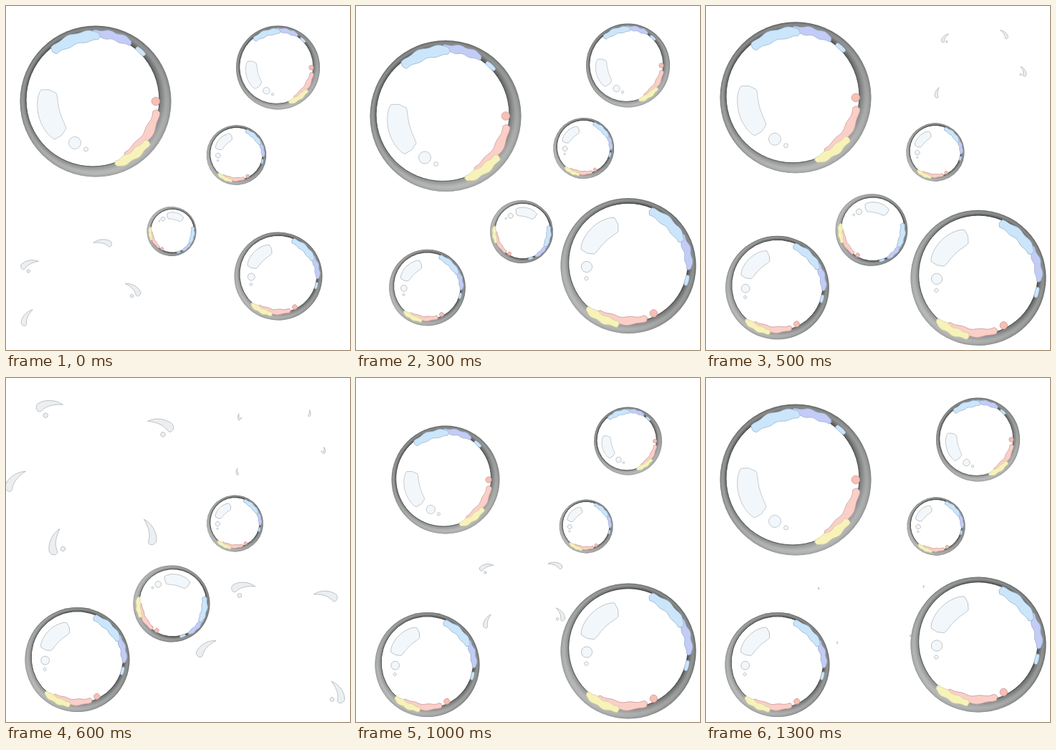
These frames come from a looping animation (480 by 480 pixels, 1400 ms). An HTML page with a canvas:

```html
<!DOCTYPE html>
<html>
<head>
<meta charset="utf-8">
<title>Bubbles</title>
<style>
html, body { margin: 0; width: 100%; height: 100%; overflow: hidden; background: #fff; }
canvas { display: block; width: 100vw; height: 100vh; }
</style>
</head>
<body>
<canvas id="stage" width="480" height="480"></canvas>
<script>
const ctx = document.getElementById('stage').getContext('2d');
const STEP = 100, STEPS = 14, SIZE = 105.6;
const rad = deg => deg * Math.PI / 180;

// A bubble is born at a share `from` of its radius r and grows by `rate` each step.
// sway: [step, y] key points; drops: directions in which it bursts at step `pop`.
const bubbles = [
  { x: 125, r: 105.5, turn: 0, born: 9, from: .58, rate: .135, pop: 6, span: 3,
    drops: [-125, 174, 120, 48, -36], sway: [[0, 133], [3, 153.5], [4, 125], [10, 142], [13, 142]] },
  { x: 379.5, r: 58.5, turn: 0, born: 7, from: .42, rate: .13, pop: 4, span: 3,
    drops: [-127, -62, -3, 155], sway: [[0, 86], [3, 83], [8, 90], [12, 86]] },
  { x: 321.5, r: 40, turn: 62, born: 0, from: 1, rate: 0, pulse: .07, lean: .4,
    sway: [[0, 208], [3, 198.5], [4, 205], [6, 203], [8, 217], [10, 207]] },
  { x: 231, r: 57.5, turn: 119, born: 0, from: .6, rate: .055, pop: 10, span: 4,
    drops: [-143, -40, 28, 141], sway: [[0, 314.5], [3, 315], [4, 310], [6, 315], [8, 300.5]] },
  { x: 380, r: 94.5, turn: 62, born: 0, from: .65, rate: .12, pop: 6, span: 3,
    drops: [-119, -49, 35, 182], sway: [[0, 377], [3, 362.5], [4, 379], [10, 381], [13, 372]] },
  { x: 99.5, r: 73, turn: 62, born: 3, from: .73, rate: .13, pop: 0, span: 3,
    drops: [-149, -63, -4, 154], sway: [[0, 400], [3, 393], [6, 393], [8, 400]] }
];

function heightAt(sway, step) {
  const i = sway.findIndex(k => k[0] >= step);
  if (i < 0) return sway[sway.length - 1][1];
  const [s1, y1] = sway[i], [s0, y0] = sway[Math.max(0, i - 1)];
  return s1 === s0 ? y1 : y0 + (y1 - y0) * (step - s0) / (s1 - s0);
}

function paint(fill, line) {
  ctx.fillStyle = fill;
  ctx.fill();
  if (line) {
    ctx.strokeStyle = line;
    ctx.stroke();
  }
}

function dot(x, y, r, fill, line) {
  ctx.beginPath();
  ctx.arc(x, y, r, 0, 7);
  paint(fill, line);
}

// Curved patch between two angles and two radii, with rounded ends and a slightly wavy edge
function band(a0, a1, r0, r1, fill, line, wave = 0) {
  const n = 28;
  ctx.beginPath();
  for (let i = 0; i <= 2 * n; i++) {
    const side = i <= n ? 1 : -1, u = side > 0 ? i / n : 2 - i / n;
    const half = (r1 - r0) / 2 * Math.abs(Math.sin(Math.PI * u)) ** .15;
    const r = (r0 + r1) / 2 + side * half + wave * Math.sin(u * 17 + side);
    const a = rad(a0 + (a1 - a0) * u);
    ctx.lineTo(r * Math.cos(a), r * Math.sin(a));
  }
  ctx.closePath();
  paint(fill, line);
}

const rim = ctx.createRadialGradient(-4, -2, 92, 0, 0, SIZE);
['#2f3231', '#505453', '#6e7170', '#858887', '#7b7e7d', '#565958'].forEach((c, i) => rim.addColorStop(i / 5, c));

const shine = ctx.createConicGradient(0, 0, 0);
for (let a = 0; a <= 360; a += 15)
  shine.addColorStop(a / 360, `rgba(255,255,255,${.22 + .2 * Math.cos(rad(a - 75))})`);

function drawBubble(x, y, r, turn) {
  const s = r / SIZE, blue = '#9db2cc', pink = '#cf9c98', gray = '#b8bcbf', white = '#f2f7fb';
  ctx.save();
  ctx.translate(x, y);
  ctx.rotate(rad(turn));
  ctx.scale(s, s);
  ctx.lineWidth = .8 / s;
  dot(0, 0, SIZE, rim);
  dot(0, 0, SIZE, shine);
  dot(-4, -2, 93, '#fff', '#3c3f3e');
  band(-93, -58, 89, 100, '#c3ccf7', blue, 1);
  band(-131, -86, 84, 99, '#cbe6fb', blue, 1);
  band(-53, -43, 91, 97, '#cbe6fb', blue);
  band(135, 194, 52, 82, white, gray);
  dot(-29, 58, 8.5, white, gray);
  dot(-13.5, 67, 3, white, gray);
  dot(84, 0, 5.8, '#f8bfb7', pink);
  band(8, 62, 80, 92, '#facfc8', pink, 1);
  band(37, 73, 86, 98, '#f7f3b8', '#d3cfa6', 1);
  ctx.restore();
}

// Drops fly off sideways, fall, turn upright and shrink
function drawBurst({ x, r, drops, sway, pop }, step) {
  const age = step - pop, top = heightAt(sway, pop);
  const length = .34 * r * (1 - .28 * age);
  drops.forEach((deg, i) => {
    const c = Math.cos(rad(deg)), s = Math.sin(rad(deg));
    const tilt = 42 + 40 * s, side = Math.sign(c);
    ctx.save();
    ctx.translate(x + r * c * (1.07 + .3 * age * Math.max(0, -s)), top + r * 1.07 * s + 10 * age);
    ctx.rotate(side * rad(tilt + (95 - tilt) * Math.min(1, age / 2)));
    ctx.scale(-side * length, length);
    ctx.lineWidth = .7 / length;
    ctx.beginPath();
    ctx.moveTo(.53, .06);
    ctx.bezierCurveTo(.25, -.22, -.2, -.26, -.45, -.12);
    ctx.bezierCurveTo(-.6, .05, -.45, .28, -.3, .14);
    ctx.bezierCurveTo(-.1, 0, .2, -.02, .53, .06);
    paint('#ebeff1', '#adb2b4');
    if (i % 2 === 0) dot(-.2, .36, .09, '#ebeff1', '#adb2b4');
    ctx.restore();
  });
}

const begin = performance.now();
function draw() {
  const step = Math.floor((performance.now() - begin) / STEP) % STEPS;
  ctx.fillStyle = '#fff';
  ctx.fillRect(0, 0, 480, 480);
  for (const b of bubbles) {
    if (step >= b.pop && step < b.pop + b.span) {
      drawBurst(b, step);
      continue;
    }
    const { pulse = 0, lean = 0 } = b;
    const y = heightAt(b.sway, step), age = (step - b.born + STEPS) % STEPS;
    const size = Math.min(1, b.from + b.rate * age) + pulse * Math.cos(2 * Math.PI * (step - 2) / STEPS);
    drawBubble(b.x + lean * (y - b.sway[0][1]), y, b.r * size, b.turn);
  }
  requestAnimationFrame(draw);
}
draw();
</script>
</body>
</html>
```
